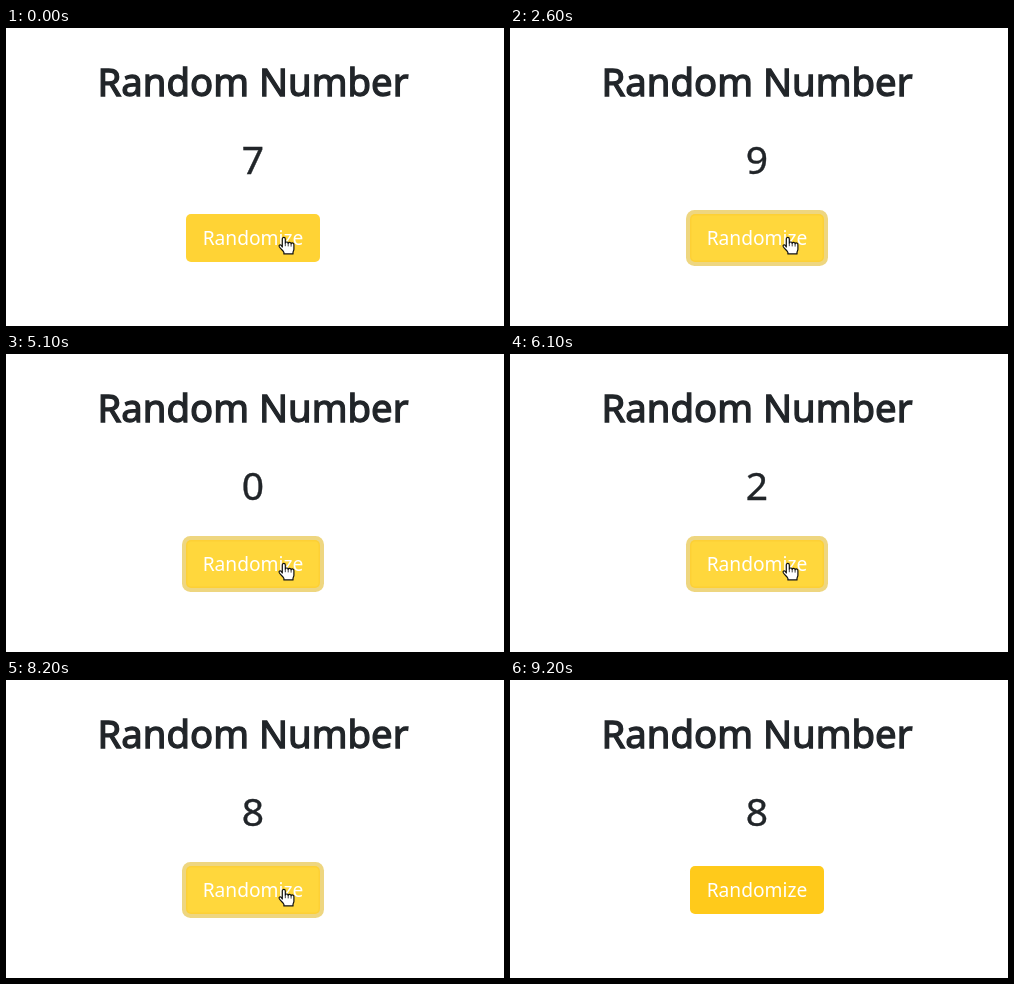
Animation of 498 by 298 pixels, one loop 9.3 s. Source, as an HTML page:

```html
<!DOCTYPE html>
<html lang="en">
<head>
<meta charset="utf-8">
<title>Random Number</title>
<style>
  html, body { margin: 0; width: 100%; height: 100%; overflow: hidden; background: #fff; }
  svg { display: block; width: 498px; height: 298px; }
  text { font-family: "Noto Sans", "Open Sans", sans-serif; text-anchor: middle; fill: #212529; }
  #title { font-size: 38.3px; font-weight: 500; stroke: #212529; stroke-width: 1.3px; }
  #digit { font-size: 39px; stroke: #212529; stroke-width: .4px; }
  #label { font-size: 19.2px; fill: #fff; }
  .pointer { fill: #fff; stroke: #111; stroke-width: 1.2px; stroke-linejoin: round; }
</style>
</head>
<body>
<svg viewBox="0 0 498 298">
  <text id="title" x="247" y="67.5">Random Number</text>
  <text id="digit" x="247" y="146"></text>
  <rect id="ring" x="176" y="182" width="142" height="56" rx="8.5" fill="#eed680"/>
  <rect id="edge" x="180" y="186" width="134" height="48" rx="5"/>
  <rect id="face" x="181.5" y="187.5" width="131" height="45" rx="4"/>
  <text id="label" x="247" y="217">Randomize</text>
  <g id="cursor">
    <g id="hand" class="pointer">
      <path d="M3.8 10V1.9a1.5 1.5 0 0 1 3 0V6a1.5 1.5 0 0 1 2.9 .3a1.5 1.5 0 0 1 2.9 .5a1.5 1.5 0 0 1 2.8 1V12.2c0 1.4-.9 2-.9 3.2V16.9H5.4V15.4C4.6 13.4 2.2 12 .8 9.7c-.8-1.5 1-2.5 2-1.3Z"/>
      <path d="M6.8 6V9.2M9.7 6.3V9.4M12.6 6.8V9.6" stroke-width=".8"/>
    </g>
    <path id="arrow" class="pointer" d="M1 1V15L4.4 11.9L6.6 17L9 16L6.8 11H11.4Z"/>
  </g>
</svg>
<script>
  const LOOP = 9300, TICK = 100;

  // Bursts of clicks: start, end, number of clicks, last digit
  const bursts = [
    [400, 900, 4, 9], [1300, 2200, 6, 1], [2400, 3300, 6, 7], [3600, 4600, 7, 4],
    [4800, 5100, 3, 0], [5400, 6100, 6, 2], [6500, 7400, 6, 8], [7800, 8200, 4, 8]
  ];

  const HOVER = [255, 211, 53], FOCUS = [255, 215, 60];
  const EDGE = [253, 208, 53], REST = [255, 202, 27];

  const el = id => document.getElementById(id);
  const ramp = (t, from, to) => Math.max(0, Math.min(1, (t - from) / (to - from)));
  const lerp = (a, b, k) => a + (b - a) * k;
  const mix = (a, b, k) => `rgb(${a.map((v, i) => Math.round(lerp(v, b[i], k)))})`;
  const show = (id, on) => el(id).setAttribute("visibility", on ? "visible" : "hidden");

  // Within a burst the digits climb by 7 (mod 10) to the last one.
  function digitAt(t) {
    const burst = bursts.filter(b => b[0] <= t).pop();
    if (!burst) return 7;
    const [start, end, clicks, last] = burst;
    let left = clicks - 1;
    for (let i = 1; i < clicks; i++) {
      const click = lerp(start, end, i / (clicks - 1));
      if (Math.round(click / TICK) * TICK <= t) left--;
    }
    return (last + 3 * left) % 10;
  }

  function drawButton(t) {
    const focus = ramp(t, 300, 500), blur = ramp(t, 8800, 9100);
    const paint = (id, focused) =>
      el(id).setAttribute("fill", mix(HOVER.map((v, i) => lerp(v, focused[i], focus)), REST, blur));
    paint("face", FOCUS);
    paint("edge", EDGE);
    el("ring").setAttribute("opacity", focus * (1 - blur));
  }

  function drawCursor(t) {
    const leave = ramp(t, 8300, 8800);
    const x = lerp(272.5, 70, leave), y = lerp(209, 0, leave);
    const present = t < 8900, overButton = y > 186;
    el("cursor").setAttribute("transform", `translate(${x} ${y})`);
    show("hand", present && overButton);
    show("arrow", present && !overButton);
  }

  function draw(ms) {
    const t = Math.floor((ms % LOOP) / TICK) * TICK;
    el("digit").textContent = digitAt(t);
    drawButton(t);
    drawCursor(t);
  }

  const start = performance.now();
  function frame() {
    draw(performance.now() - start);
    requestAnimationFrame(frame);
  }
  draw(0);
  requestAnimationFrame(frame);
</script>
</body>
</html>
```
